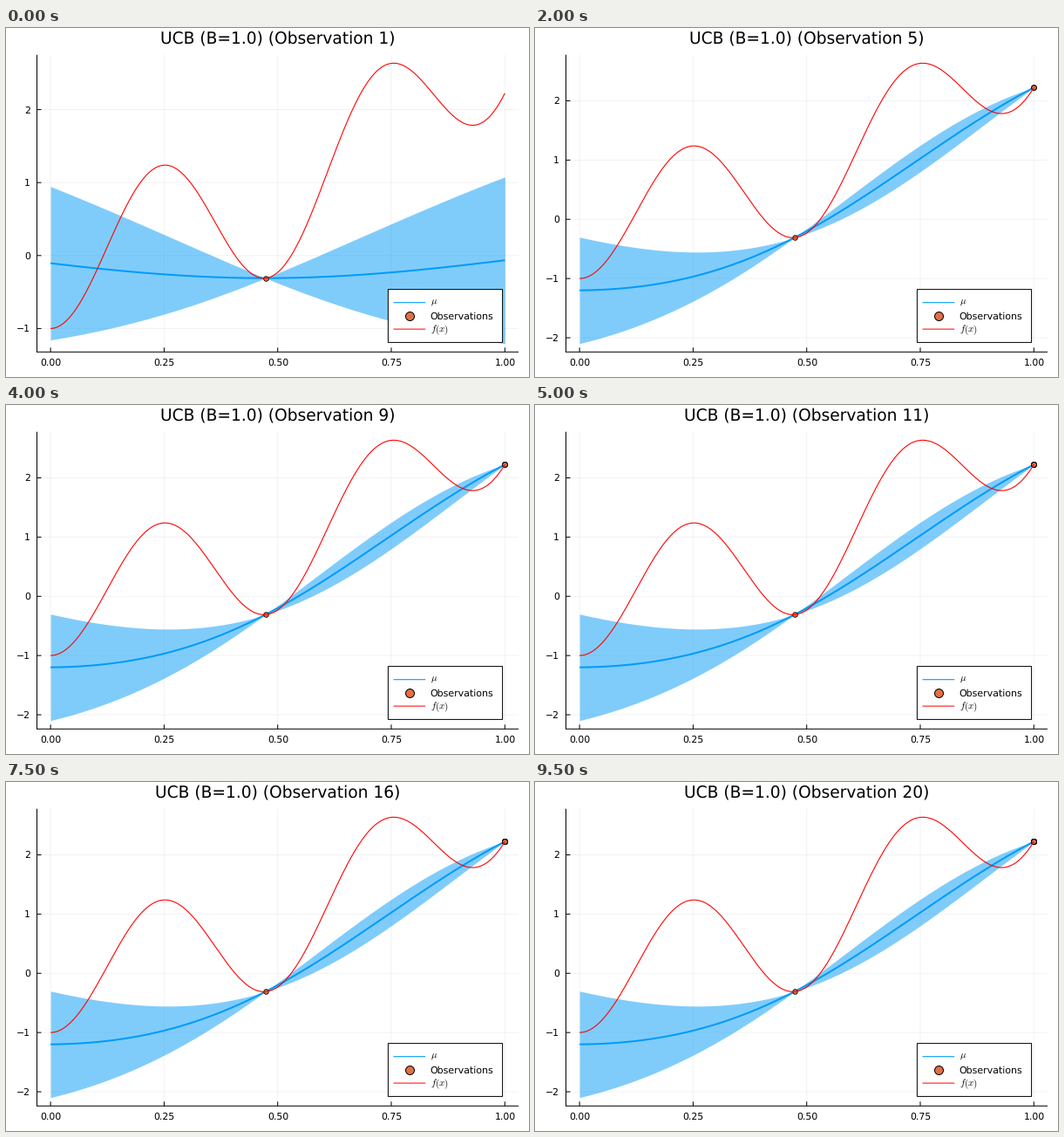
Write a matplotlib script that moves like this. It is 600x400 px and loops after 10000 ms.

```python
import numpy as np
import matplotlib.pyplot as plt
from matplotlib.animation import FuncAnimation
from matplotlib.patches import Rectangle

plt.rcParams["font.family"] = "DejaVu Sans"
plt.rcParams["mathtext.fontset"] = "cm"
plt.rcParams["text.hinting"] = "none"

PT = 0.72  # points per pixel at 100 dpi
BLUE, ORANGE = "#009AF9", "#E26F46"
LEFT, RIGHT, TOP, BOTTOM = 35.5, 588.0, 30.7, 371.3
X0, X1 = 51.1, 572.3
FIRST = 0.473
PRIOR_MEAN, LENGTH, Z = 1.0, 1.0, 1.96


def basis(x):
    w = 4 * np.pi
    c, s = np.cos(w * x), np.sin(w * x)
    return np.stack([x**0, x, x**2, x**3, c, s, x * c, x * s], axis=-1)


def fit_objective():
    """Wavy function fitted to its end values and turning points."""
    turns = np.array([0, 0.249, 0.4745, 0.7525, 0.927])
    levels = np.array([-1, 1.237, -0.308, 2.636, 1.787])
    h = 1e-5
    slope = (basis(turns + h) - basis(turns - h)) / (2 * h)
    rows = np.vstack([basis(np.append(turns, 1.0)), 0.02 * slope])
    goal = np.concatenate([levels, [2.223], np.zeros(len(turns))])
    coef = np.linalg.lstsq(rows, goal, rcond=None)[0]
    return lambda x: basis(np.asarray(x, float)) @ coef


def kernel(a, b):
    t = np.sqrt(5) * np.abs(a[:, None] - b[None, :]) / LENGTH
    return (1 + t + t**2 / 3) * np.exp(-t)


def posterior(x, xs, ys):
    k = kernel(x, xs)
    gain = np.linalg.solve(kernel(xs, xs), k.T).T
    mean = PRIOR_MEAN + gain @ (ys - PRIOR_MEAN)
    var = 1 - np.sum(gain * k, axis=1)
    return mean, np.sqrt(np.maximum(var, 0))


objective = fit_objective()
grid = np.linspace(0, 1, 501)
truth = objective(grid)

fig = plt.figure(figsize=(6, 4), dpi=100, facecolor="white")
ax = fig.add_axes([0, 0, 1, 1])


def px(x):
    return X0 + (X1 - X0) * np.asarray(x)


def line(x, y, color, width, **kw):
    ax.plot(x, y, color=color, lw=width * PT, snap=False,
            solid_capstyle="butt", **kw)


def label(x, y, text, size, ha="left", **kw):
    ax.text(x, y, text, fontsize=size * PT, ha=ha, va="baseline", **kw)


def dots(x, y, diameter, edge, z):
    for xi, yi in zip(x, y):
        ax.plot([xi], [yi], "o", ms=diameter * PT, mfc=ORANGE, mec="black",
                mew=edge * PT, snap=False, zorder=z)


def draw_axes(py, y_ticks):
    faint = dict(alpha=0.05, zorder=1)
    for v in np.linspace(0, 1, 5):
        x = px(v)
        line([x, x], [TOP, BOTTOM], "black", 1, **faint)
        line([x, x], [BOTTOM, BOTTOM - 5], "black", 1, zorder=6)
        label(x + 0.2, 387, f"{v:.2f}", 10.9, "center")
    for v in y_ticks:
        y = py(v)
        line([LEFT, RIGHT], [y, y], "black", 1, **faint)
        line([LEFT, LEFT + 5], [y, y], "black", 1, zorder=6)
        label(28, y + 4, str(v).replace("-", "\u2212"), 10.9, "right")
    line([LEFT, LEFT], [TOP, BOTTOM + 0.5], "black", 1, zorder=6)
    line([LEFT, RIGHT], [BOTTOM, BOTTOM], "black", 1, zorder=6)


def draw_legend():
    ax.add_patch(Rectangle((438.4, 299.6), 131.2, 60.8, fc="white", ec="black",
                           lw=PT, snap=False, zorder=7))
    line([444.5, 481.2], [314.7, 314.7], BLUE, 1.1, zorder=8)
    line([444.5, 481.2], [345.1, 345.1], "red", 1, zorder=8)
    dots([462.7], [329.9], 10, 1, 8)
    label(487, 317, r"$\mu$", 11, zorder=8)
    label(486.8, 334, "Observations", 10.95, zorder=8)
    label(487, 348.5, r"$f(x)$", 11, zorder=8)


def draw(frame):
    ax.clear()
    ax.set(xlim=(0, 600), ylim=(400, 0))
    ax.axis("off")

    # Every query after the first lands on the right end.
    sampled = np.array([FIRST] + [1.0] * frame)
    xs = np.unique(sampled)
    mean, sd = posterior(grid, xs, objective(xs))
    low, high = mean - Z * sd, mean + Z * sd
    lo, hi = min(low.min(), truth.min()), max(high.max(), truth.max())
    pad = 0.03 * (hi - lo)
    lo, hi = lo - pad, hi + pad

    def py(y):
        return TOP + (hi - np.asarray(y)) / (hi - lo) * (BOTTOM - TOP)

    draw_axes(py, range(int(np.ceil(lo)), int(hi) + 1))
    x = px(grid)
    ax.fill_between(x, py(low), py(high), color=BLUE, alpha=0.5, lw=0,
                    snap=False, zorder=2)
    line(x, py(mean), BLUE, 2, zorder=3)
    dots(px(sampled), py(objective(sampled)), 5.6, 0.8, 4)
    line(x, py(truth), "red", 1.1, zorder=5)
    draw_legend()
    label(311.8, 18, f"UCB (B=1.0) (Observation {frame + 1})", 18.6, "center")
    return []


anim = FuncAnimation(fig, draw, frames=20, interval=500, init_func=lambda: [],
                     repeat=True, repeat_delay=0)
plt.show()
```
